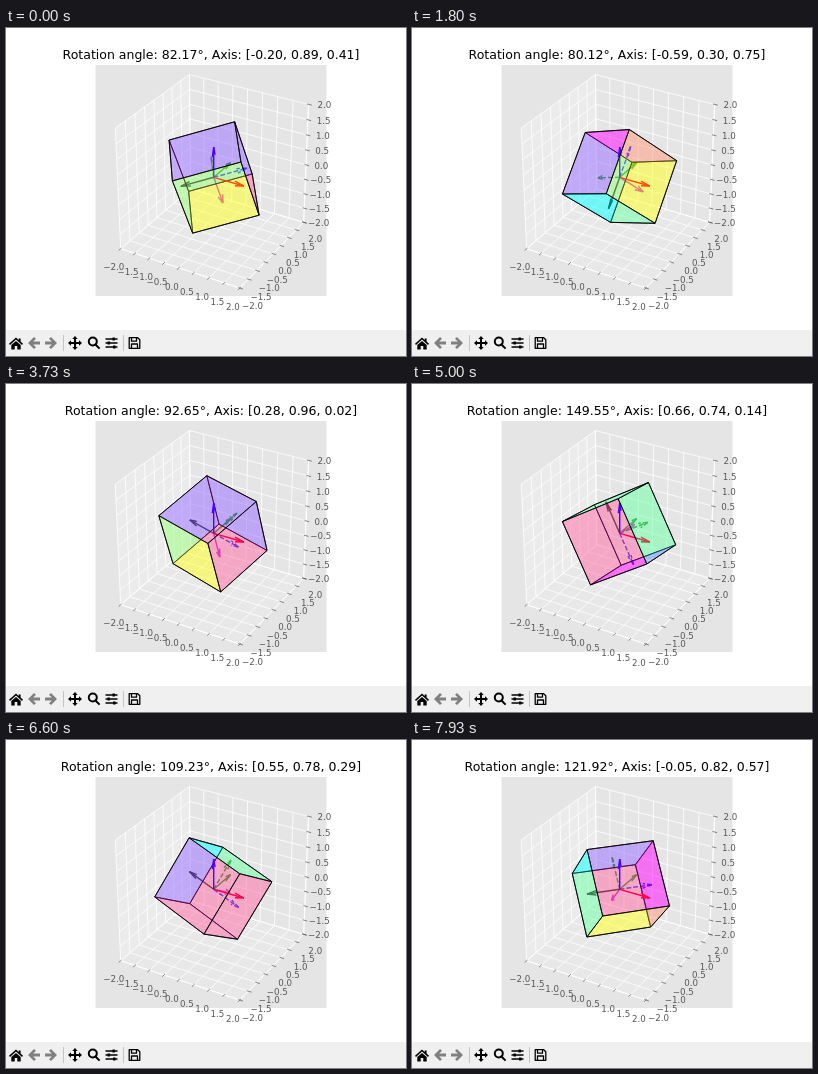
These frames come from a looping animation (400x328 px, 8000 ms). An HTML page with a canvas:

```html
<!DOCTYPE html>
<html lang="en">
<head>
<meta charset="utf-8">
<title>Rotating cube</title>
<style>
  html, body { margin: 0; width: 100%; height: 100%; overflow: hidden; background: #fff; }
  canvas { display: block; width: 400px; height: 328px; }
</style>
</head>
<body>
<canvas id="stage" width="400" height="328"></canvas>
<script>
const ctx = document.getElementById('stage').getContext('2d');
const LOOP = 8000, FPS = 15, LAST_STEP = 119;
const MAGENTA = '#f0f', YELLOW = '#ffff1e', CYAN = '#0ff';

// step, angle in degrees, rotation axis
const poses = [
  [0, 82.17, -0.20, 0.89, 0.41],
  [27, 80.12, -0.59, 0.30, 0.75],
  [39, 82.00, -0.47, 0.73, 0.49],
  [56, 92.65, 0.28, 0.96, 0.02],
  [75, 149.55, 0.66, 0.74, 0.14],
  [99, 109.23, 0.55, 0.78, 0.29],
  [119, 121.92, -0.05, 0.82, 0.57]
].map(([step, angle, ...axis]) => {
  const half = angle * Math.PI / 360, length = Math.hypot(...axis);
  return { step, q: [Math.cos(half), ...axis.map(v => v / length * Math.sin(half))] };
});

// ---- Rotation ----
function slope(i, k) {
  const a = poses[Math.max(i - 1, 0)], b = poses[Math.min(i + 1, poses.length - 1)];
  return (b.q[k] - a.q[k]) / (b.step - a.step);
}

function orientation(step) {
  let i = 0;
  while (i < poses.length - 2 && step >= poses[i + 1].step) i++;
  const a = poses[i], b = poses[i + 1], span = b.step - a.step;
  const u = (step - a.step) / span, v = 1 - u;
  const q = a.q.map((start, k) =>
    v * v * (1 + 2 * u) * start + u * u * (3 - 2 * u) * b.q[k] +
    span * u * v * (v * slope(i, k) - u * slope(i + 1, k)));
  const length = Math.hypot(...q);
  return q.map(c => c / length);
}

// Images of the three unit vectors
function basis([w, x, y, z]) {
  return [
    [1 - 2 * (y * y + z * z), 2 * (x * y + w * z), 2 * (x * z - w * y)],
    [2 * (x * y - w * z), 1 - 2 * (x * x + z * z), 2 * (y * z + w * x)],
    [2 * (x * z + w * y), 2 * (y * z - w * x), 1 - 2 * (x * x + y * y)]
  ];
}

// ---- Camera: elevation 30, azimuth -60, slight perspective ----
const COS = Math.sqrt(3) / 2, PERSPECTIVE = 0.0275;
const depth = ([x, y, z]) => 0.433 * x - 0.75 * y + 0.5 * z;
function project(p) {
  const [x, y, z] = p, scale = 34.4 / (1 - PERSPECTIVE * depth(p));
  return [207.7 + scale * (COS * x + 0.5 * y),
          149.3 - scale * (-0.25 * x + 0.433 * y + COS * z)];
}

function trace(points, closed) {
  ctx.beginPath();
  points.forEach(p => ctx.lineTo(...project(p)));
  if (closed) ctx.closePath();
}

function line(points, color, width) {
  trace(points);
  ctx.strokeStyle = color;
  ctx.lineWidth = width;
  ctx.stroke();
}

function fillFace(points, color, alpha) {
  trace(points, true);
  ctx.globalAlpha = alpha;
  ctx.fillStyle = color;
  ctx.fill();
  ctx.globalAlpha = 1;
}

// ---- Axes ----
const ticks = Array.from({ length: 9 }, (_, i) => i / 2 - 2);
const square = fn => [[-2, -2], [2, -2], [2, 2], [-2, 2]].map(([a, b]) => fn(a, b));

function tickLabel(value, p, dy) {
  const [x, y] = project(p);
  ctx.fillText(value.toFixed(1).replace('-', '\u2212'), x, y + 3.2 + dy);
}

function drawAxes() {
  ctx.fillStyle = '#e5e5e5';
  ctx.fillRect(89.5, 37, 231, 231);
  fillFace(square((a, b) => [-2, a, b]), '#f2f2f2', 0.5);
  fillFace(square((a, b) => [a, 2, b]), '#e6e6e6', 0.5);
  fillFace(square((a, b) => [a, b, -2]), '#ececec', 0.5);
  for (const t of ticks) {
    line([[t, -2, -2], [t, 2, -2], [t, 2, 2]], '#fff', 0.8);
    line([[2, t, -2], [-2, t, -2], [-2, t, 2]], '#fff', 0.8);
    line([[-2, -2, t], [-2, 2, t], [2, 2, t]], '#fff', 0.8);
  }
  line([[-2, -2, -2], [2, -2, -2], [2, 2, -2], [2, 2, 2]], '#fff', 0.9);

  ctx.font = '8.68px "DejaVu Sans", sans-serif';
  ctx.textAlign = 'center';
  for (const t of ticks) {
    line([[t, -1.95, -2], [t, -2.1, -2]], '#555', 0.7);
    line([[1.95, t, -2], [2.1, t, -2]], '#555', 0.7);
    line([[1.95, 2, t], [2.1, 2, t]], '#555', 0.7);
    ctx.fillStyle = '#555';
    tickLabel(t, [t, -2.39, -2.39], 0.5);
    tickLabel(t, [2.41, t, -2.41], 1.5);
    tickLabel(t, [2.34, 2.34, t], 2.8);
  }
}

// ---- Cube and arrows ----
const faces = [
  [0, -1, MAGENTA], [0, 1, YELLOW],
  [1, -1, YELLOW], [1, 1, CYAN],
  [2, -1, CYAN], [2, 1, MAGENTA]
];
const corners = [[-1, -1], [1, -1], [1, 1], [-1, 1]];

function drawFace([axis, sign, color], axes) {
  const n = axes[axis], a = axes[(axis + 1) % 3], b = axes[(axis + 2) % 3];
  const points = corners.map(([s, t]) => n.map((v, k) => sign * v + s * a[k] + t * b[k]));
  fillFace(points, color, 0.3);
  ctx.strokeStyle = '#000';
  ctx.lineWidth = 0.85;
  ctx.lineJoin = 'round';
  ctx.stroke();
}

function drawArrow(tip, color, dash = []) {
  const [x, y, z] = tip, flat = Math.hypot(x, y);
  const [dx, dy] = flat ? [x / flat, y / flat] : [0, 1];
  ctx.setLineDash(dash);
  line([[0, 0, 0], tip], color, 1.4);
  for (const side of [-1, 1]) {
    const a = Math.atan2(z, flat) + side * Math.PI / 12, r = 0.3 * Math.cos(a);
    line([tip, [x - r * dx, y - r * dy, z - 0.3 * Math.sin(a)]], color, 1.4);
  }
  ctx.setLineDash([]);
}

function drawScene(axes) {
  const dashes = [4.8, 2.1];
  const isFront = ([axis, sign]) => sign * depth(axes[axis]) > PERSPECTIVE;

  drawArrow([0, 1, 0], '#008000');
  drawArrow(axes[0], '#bf00bf');
  drawArrow(axes[1], '#008000', dashes);
  drawArrow(axes[2], '#00f', dashes);
  drawArrow(axes[2].map(v => -v), '#000');
  faces.filter(face => !isFront(face)).forEach(face => drawFace(face, axes));
  drawArrow([1, 0, 0], '#f00');
  drawArrow([0, 0, 1], '#00f');
  faces.filter(isFront).forEach(face => drawFace(face, axes));
}

function drawTitle([w, ...v]) {
  const length = Math.hypot(...v);
  const angle = 2 * Math.atan2(length, w) * 180 / Math.PI;
  const axis = v.map(c => (c / length).toFixed(2)).join(', ');
  ctx.font = '12.5px "DejaVu Sans", sans-serif';
  ctx.textAlign = 'center';
  ctx.fillStyle = '#000';
  ctx.fillText(`Rotation angle: ${angle.toFixed(2)}°, Axis: [${axis}]`, 205, 31);
}

// ---- Toolbar ----
const leftArrow = 'M-6 0L0-6L2-4.2L-.8-1.4H6V1.4H-.8L2 4.2L0 6Z';
const icons = [
  [10, 315.5, '#000', 'M-7 .3L0-6L2.7-3.5V-5H4.6V-1.9L7 .3L6 1.4L0-4L-6 1.4ZM-4.7 1.5L0-2.6L4.7 1.5V6H1.3V2.4H-1.3V6H-4.7Z'],
  [28, 315, '#808080', leftArrow],
  [45, 315, '#808080', leftArrow, -1],
  [69, 315, '#000', 'M0-7L2.7-4H1V-1H4V-2.7L7 0L4 2.7V1H1V4H2.7L0 7L-2.7 4H-1V1H-4V2.7L-7 0L-4-2.7V-1H-1V-4H-2.7Z']
].map(([x, y, color, path, flip = 1]) => ({ x, y, color, flip, path: new Path2D(path) }));
const lens = new Path2D('M2.8-1.5A4 4 0 1 1-5.2-1.5A4 4 0 1 1 2.8-1.5M1.7 1.7L5.6 5.6');
const sliders = new Path2D('M-6-4H6M-6 0H6M-6 4H6');
const knobs = new Path2D('M1-5.6H3.4V-2.4H1ZM-4-1.6H-1.6V1.6H-4ZM1.5 2.4H4V5.6H1.5Z');
const disk = new Path2D('M-5.3-5.3H3.2L5.3-3.2V5.3H-5.3ZM-3-5V-1.8H2V-5M-3 5V1H3V5');

function strokeIcon(path, x, y, width) {
  ctx.save();
  ctx.translate(x, y);
  ctx.strokeStyle = '#000';
  ctx.lineWidth = width;
  ctx.stroke(path);
  ctx.restore();
}

function fillIcon({ x, y, color, flip, path }) {
  ctx.save();
  ctx.translate(x, y);
  ctx.scale(flip, 1);
  ctx.fillStyle = color;
  ctx.fill(path);
  ctx.restore();
}

function drawToolbar() {
  ctx.fillStyle = '#f0f0f0';
  ctx.fillRect(0, 302, 400, 26);
  icons.forEach(fillIcon);
  strokeIcon(lens, 88, 315, 2);
  strokeIcon(sliders, 105.5, 315, 1.3);
  fillIcon({ x: 105.5, y: 315, color: '#000', flip: 1, path: knobs });
  strokeIcon(disk, 128.5, 315, 1.3);
  ctx.fillStyle = '#c4c4c4';
  ctx.fillRect(57, 307, 1, 16);
  ctx.fillRect(117, 307, 1, 16);
}

// ---- Playback ----
const start = performance.now();
function render() {
  const time = (performance.now() - start) % LOOP;
  const step = Math.min(LAST_STEP, Math.floor(time * FPS / 1000 + 0.1));
  const q = orientation(step);
  ctx.fillStyle = '#fff';
  ctx.fillRect(0, 0, 400, 328);
  drawAxes();
  drawScene(basis(q));
  drawTitle(q);
  drawToolbar();
  requestAnimationFrame(render);
}
render();
</script>
</body>
</html>
```
